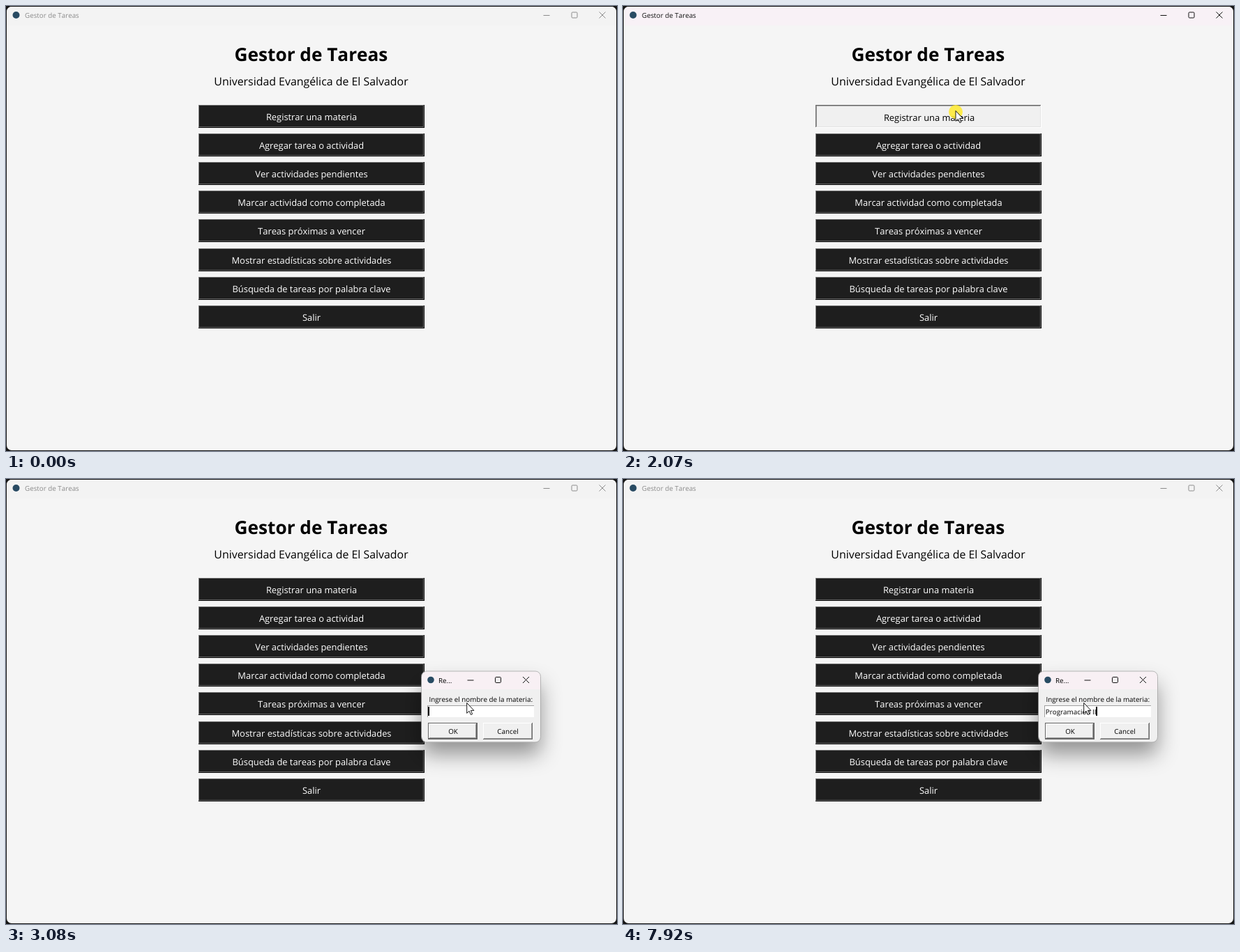
These frames come from a looping animation (876 px wide and 639 px high, 8000 ms). An HTML page:

```html
<!DOCTYPE html>
<html lang="es">
<head>
<meta charset="utf-8">
<title>Gestor de Tareas</title>
<style>
html, body { margin: 0; width: 100%; height: 100%; overflow: hidden; background: #151515; }
svg { display: block; }
text { font: 9.8px "Open Sans", "Noto Sans", sans-serif; font-kerning: none; text-rendering: geometricPrecision; }
.mid { text-anchor: middle; }
.menu { font-size: 12.9px; }
.ctl { fill: none; stroke: currentColor; }
</style>
</head>
<body>
<svg id="stage" width="876" height="639" viewBox="0 0 876 639"></svg>
<script>
const LOOP = 8000, STEP = 200 / 3;
const LABELS = ["Registrar una materia", "Agregar tarea o actividad", "Ver actividades pendientes",
  "Marcar actividad como completada", "Tareas próximas a vencer", "Mostrar estadísticas sobre actividades",
  "Búsqueda de tareas por palabra clave", "Salir"];

// Pointer way points: time, x, y
const PATH = [[390, 738, 525], [667, 437, 233], [867, 437, 233], [1133, 464, 176], [1533, 471, 147],
  [1800, 471, 147], [1866, 477, 150.5], [2200, 477, 150.5], [2800, 645, 309], [2866, 660.7, 321.5]];

// Entry contents from each time on
const WORD = "Programación\u00a0II";
const TYPED = [[0, ""], [3820, "p"], [4550, ""],
  ...[5030, 5550, 5680, 5810, 6010, 6480, 6550, 6680, 6870, 6940, 7070, 7260, 7500, 7720, 7920]
    .map((at, i) => [at, WORD.slice(0, i + 1)])];

const rect = (x, y, w, h, fill, more = "") =>
  `<rect x="${x}" y="${y}" width="${w}" height="${h}" fill="${fill}" ${more}/>`;
const text = (x, y, s, more = "") => `<text x="${x}" y="${y}" ${more}>${s}</text>`;

// Bevelled box: outer and inner colours for the top-left and bottom-right edges
function bevel(x, y, w, h, fill, [tl, tlIn, br, brIn]) {
  const ring = (d, a, b) =>
    rect(x + d, y + d, w - 2 * d, h - 2 * d, b) + rect(x + d, y + d, w - 2 * d - 1, h - 2 * d - 1, a);
  return ring(0, tl, br) + ring(1, tlIn, brIn) + rect(x + 2, y + 2, w - 4, h - 4, fill);
}

const controls = (min, max, close, y) => `<path class="ctl" d="M${min - 4.5} ${y + .5}h9
  M${close - 4.5} ${y - 4.5}l9 9m0 -9l-9 9"/>` +
  rect(max - 4, y - 4, 8, 8, "none", 'rx="1.2" class="ctl"');

const RAISED = ["#fff", "#f0f0f0", "#696969", "#a0a0a0"];

const menu = LABELS.map((label, i) => {
  const y = Math.round(142 + 41.1 * i);
  return bevel(276, y, 324, 33, "#1e1e1e", ["#777", "#1e1e1e", "#000", "#6a6a6a"]) +
    text(438, y + 22, label, 'class="mid menu" fill="#fff"');
}).join("");

const pressed = bevel(276, 142, 324, 33, "#f0f0f0", ["#696969", "#a0a0a0", "#fff", "#e3e3e3"]) +
  text(439, 165, LABELS[0], 'class="mid menu"');

const $ = id => document.getElementById(id);
$("stage").innerHTML = `
<defs>
  <filter id="shadow" x="-50%" y="-60%" width="200%" height="240%">
    <feDropShadow dx="0" dy="18" stdDeviation="15" flood-opacity=".4"/>
  </filter>
  <clipPath id="frame">${rect(1, 1, 874, 637, "#000", 'rx="7"')}</clipPath>
  <clipPath id="dialogFrame">${rect(596, 276.5, 170, 101, "#000", 'rx="7"')}</clipPath>
</defs>
<g clip-path="url(#frame)">
  ${rect(0, 0, 876, 639, "#f5f5f5")}
  ${rect(0, 0, 876, 28, "#f3f3f3", 'id="bar"')}
  <circle cx="14.5" cy="13" r="5" fill="#294b63"/>
  <g id="caption">${text(27, 17.4, "Gestor de Tareas", 'fill="currentColor"')}${controls(775, 815, 855, 13)}</g>
  ${text(437.5, 79, "Gestor de Tareas", 'class="mid" style="font-size:26.2px;font-weight:700"')}
  ${text(437.5, 113.5, "Universidad Evangélica de El Salvador", 'class="mid" style="font-size:15.9px"')}
  ${menu}
  <g id="pressed">${pressed}<circle cx="477" cy="152" r="10" fill="#ffea2e" opacity=".85"/></g>
</g>
<g id="dialog">
  ${rect(596, 276.5, 170, 101, "#f0f0f0", 'rx="7" filter="url(#shadow)"')}
  <g clip-path="url(#dialogFrame)">${rect(595, 276, 172, 26, "#f8f0f4", 'id="dialogBar"')}</g>
  ${rect(595.5, 276, 171, 102, "none", 'rx="7.5" stroke="#a9a9a9" stroke-width=".8"')}
  <circle cx="609" cy="288.5" r="4.8" fill="#294b63"/>
  ${text(620, 292.7, "Re...")}
  <g id="dialogCtl">${controls(666, 705.5, 745.5, 288.5)}</g>
  ${text(606.5, 320, "Ingrese el nombre de la materia:")}
  ${rect(604, 325, 153, 17, "#a0a0a0")}${rect(605, 326, 152, 16, "#fff")}
  ${text(605.7, 337.5, "", 'id="entry" style="font-size:9.9px"')}
  ${rect(605, 327, 2, 13, "#000", 'id="caret"')}
  ${rect(605, 350, 71, 24, "#646464")}${bevel(606, 351, 69, 22, "#f0f0f0", RAISED)}
  ${text(641, 365.6, "OK", 'class="mid"')}
  ${bevel(684, 350, 71, 24, "#f0f0f0", RAISED)}
  ${text(719.5, 365.6, "Cancel", 'class="mid"')}
</g>
<path id="pointer" d="M0 0V14.8L3.4 11.7L5.8 17L8 16L5.7 10.9H10.2Z" fill="#fff" stroke="#000" stroke-width=".9"/>`;

const show = (id, on) => $(id).style.display = on ? "" : "none";

function pointerAt(t) {
  const i = PATH.findIndex(p => p[0] > t);
  if (i < 0) return PATH[PATH.length - 1].slice(1);
  if (i === 0) return PATH[0].slice(1);
  const [t0, x0, y0] = PATH[i - 1], [t1, x1, y1] = PATH[i];
  const k = (t - t0) / (t1 - t0);
  return [x0 + (x1 - x0) * k, y0 + (y1 - y0) * k];
}

function draw(t) {
  const q = Math.floor((t + 12) / STEP) * STEP;  // motion advances at 15 steps a second

  const down = t >= 2070 && t < 2140;
  show("pressed", down);
  $("bar").setAttribute("fill", down ? "#f8f1f6" : "#f3f3f3");
  $("caption").style.color = down ? "#111" : "#8b8b8b";

  show("pointer", t >= 390);
  $("pointer").setAttribute("transform", `translate(${pointerAt(q)})`);

  show("dialog", t >= 2140);
  const p = Math.min(1, Math.max(0, (q - 2130) / 200));
  const scale = 1 - .1 * (1 - p) ** 2;
  $("dialog").setAttribute("transform", `translate(620 301) scale(${scale}) translate(-620 -301)`);
  $("dialog").setAttribute("opacity", Math.min(1, .3 + 2 * p));
  const focused = t >= 2270;
  $("dialogBar").setAttribute("fill", focused ? "#f8f0f4" : "#f3f3f3");
  $("dialogCtl").style.color = focused ? "#111" : "#444";

  const typed = TYPED.filter(e => e[0] <= t).pop()[1];
  const entry = $("entry");
  if (entry.textContent !== typed) entry.textContent = typed;
  const end = typed && t >= 2140 ? entry.getComputedTextLength() : 0;
  $("caret").setAttribute("x", 605 + Math.round(end));
  show("caret", (t + 520 + 900) % 900 < 600);  // 600 ms on, 300 ms off
}

function tick(now) {
  draw(now % LOOP);
  requestAnimationFrame(tick);
}
draw(0);
requestAnimationFrame(tick);
</script>
</body>
</html>
```
